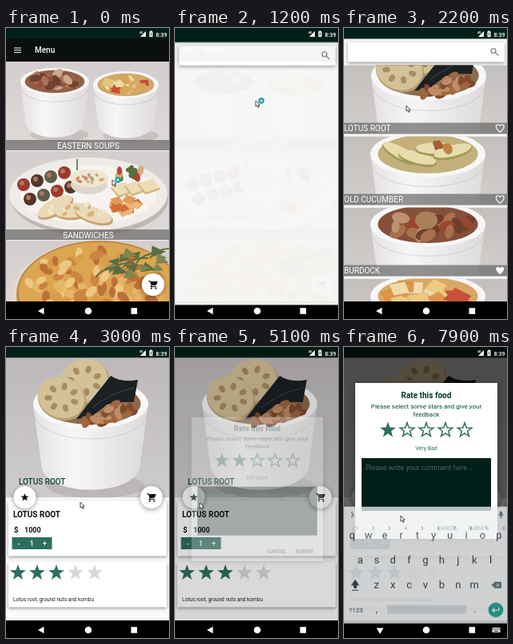
These frames come from a looping animation (204 px wide and 364 px high, 8000 ms). An HTML page with a canvas:

```html
<!DOCTYPE html>
<html lang="en">
<head>
<meta charset="utf-8">
<title>Food ordering app</title>
<style>
html, body { margin: 0; width: 100%; height: 100%; overflow: hidden; background: #000; }
canvas { display: block; width: 204px; height: 364px; }
</style>
</head>
<body>
<canvas id="stage"></canvas>
<script>
const W = 204, H = 364, LOOP = 8000, STEP = 100;
const GREEN = '#2e6e60', DARK = '#001f18', BAND = 'rgba(95,93,93,.65)', INK = '#263035';
const scale = window.devicePixelRatio || 1;

function sized(canvas) {
  canvas.width = W * scale;
  canvas.height = H * scale;
  return canvas;
}
const stage = sized(document.getElementById('stage'));
const buffer = sized(document.createElement('canvas'));
let g = stage.getContext('2d');

const HEART = new Path2D('M0 9C-14-2-9-9-5-9Q-2-9 0-6Q2-9 5-9C9-9 14-2 0 9z');
const CART = new Path2D('M-11-9h3l5 10h9l4-8h-16M-3 1l-2 4h13');
const STAR = new Path2D();
for (let i = 0; i < 10; i++) {
  const r = i % 2 ? 0.41 : 1, a = i * Math.PI / 5;
  STAR.lineTo(r * Math.sin(a), -r * Math.cos(a));
}
STAR.closePath();

// Drawing helpers
const clamp = v => Math.max(0, Math.min(1, v));
const progress = (t, start, length) => clamp((t - start) / length);
const easeOut = (p, power) => 1 - (1 - p) ** power;

function box(x, y, w, h, color) {
  g.fillStyle = color;
  g.fillRect(x, y, w, h);
}
function oval(x, y, rx, ry, color, angle = 0) {
  g.fillStyle = color;
  g.beginPath();
  g.ellipse(x, y, rx, ry, angle, 0, 7);
  g.fill();
}
function polygon(sides, x, y, rx, ry, color, angle = 0) {
  g.fillStyle = color;
  g.beginPath();
  for (let i = 0; i < sides; i++) {
    const a = angle + i * 2 * Math.PI / sides;
    g.lineTo(x + rx * Math.cos(a), y + ry * Math.sin(a));
  }
  g.fill();
}
function stroke(color, width, path) {
  g.strokeStyle = color;
  g.lineWidth = width;
  g.stroke(new Path2D(path));
}
function text(str, x, y, size, color, weight = 400, align = 'left') {
  g.font = `${weight} ${size}px Roboto, sans-serif`;
  g.textAlign = align;
  g.fillStyle = color;
  g.fillText(str, x, y);
}
const centered = (str, x, y, size, color, weight) => text(str, x, y, size, color, weight, 'center');
function shape(path, x, y, size, color, outline) {
  g.save();
  g.translate(x, y);
  g.scale(size, size);
  g.fillStyle = g.strokeStyle = color;
  g.lineWidth = outline / size;
  outline ? g.stroke(path) : g.fill(path);
  g.restore();
}
function shadowed(draw, blur = 4) {
  g.save();
  g.shadowColor = 'rgba(0,0,0,.4)';
  g.shadowBlur = blur * scale;
  g.shadowOffsetY = 1.5 * scale;
  draw();
  g.restore();
}
const card = (x, y, w, h) => shadowed(() => box(x, y, w, h, '#fff'));
const fab = (x, y) => shadowed(() => oval(x, y, 14, 14, '#fff'), 6);
function cartButton(x, y) {
  fab(x, y);
  box(x - 2.5, y - 4, 7, 4, '#111');
  shape(CART, x, y, 0.5, '#111', 1.2);
  for (const dx of [-2, 3.5]) oval(x + dx, y + 4.6, 1.1, 1.1, '#111');
}
function photo(y, h, dy, top, bottom, draw) {
  g.save();
  g.beginPath();
  g.rect(0, y, W, h);
  g.clip();
  const tone = g.createLinearGradient(0, y, 0, y + h);
  tone.addColorStop(0, top);
  tone.addColorStop(1, bottom);
  box(0, y, W, h, tone);
  g.translate(0, dy);
  draw();
  g.restore();
}
// Seeded pieces spread over an ellipse; sides = 0 makes them oval.
function scatter(seed, count, x, y, rx, ry, size, colors, sides = 0) {
  const random = () => (seed = seed * 16807 % 2147483647) / 2147483647;
  random();
  for (let i = 0; i < count; i++) {
    const a = random() * 6.28, r = Math.sqrt(random()), s = size * (0.8 + random() * 0.4);
    const px = x + rx * r * Math.cos(a), py = y + ry * r * Math.sin(a), turn = random() * 3;
    const color = colors[i % colors.length];
    if (sides) polygon(sides, px, py, s, s * 0.7, color, turn);
    else oval(px, py, s, s * 0.6, color, turn);
  }
}
// Draws a page off screen so that it can fade and move as one piece.
function layer(draw, alpha, dy = 0, zoom = 1) {
  if (alpha <= 0) return;
  const target = g;
  g = buffer.getContext('2d');
  g.setTransform(scale, 0, 0, scale, 0, 0);
  g.clearRect(0, 0, W, H);
  draw();
  g = target;
  g.save();
  g.globalAlpha = alpha;
  g.translate(W / 2, H / 2 + dy);
  g.scale(zoom, zoom);
  g.drawImage(buffer, -W / 2, -H / 2, W, H);
  g.restore();
}
function openPage(t, start, draw) {
  layer(draw, easeOut(progress(t, start, 200), 4), 29 * (1 - easeOut(progress(t, start, 350), 5)));
}

// Food
function pot(x, y, rx, ry, depth, broth) {
  const tone = g.createLinearGradient(x - rx, 0, x + rx, 0);
  tone.addColorStop(0, '#e4e1e2');
  tone.addColorStop(0.35, '#f7f6f7');
  tone.addColorStop(1, '#dddadc');
  oval(x + 6, y + depth * 0.95, rx * 0.85, ry * 0.5, 'rgba(130,122,125,.25)');
  g.fillStyle = tone;
  g.beginPath();
  g.moveTo(x - rx, y);
  g.lineTo(x - rx * 0.85, y + depth * 0.75);
  g.bezierCurveTo(x - rx * 0.7, y + depth * 1.08, x + rx * 0.7, y + depth * 1.08, x + rx * 0.85, y + depth * 0.75);
  g.lineTo(x + rx, y);
  g.fill();
  g.strokeStyle = 'rgba(150,145,148,.3)';
  g.lineWidth = 1;
  g.beginPath();
  g.ellipse(x, y + depth * 0.12, rx * 0.97, ry, 0, 0.1, Math.PI - 0.1);
  g.stroke();
  oval(x, y, rx, ry, '#f8f7f7');
  oval(x, y, rx * 0.87, ry * 0.84, broth);
}
function lotusSlice(x, y, r, angle) {
  oval(x, y, r, r * 0.85, '#b79e70', angle);
  oval(x - 1, y - 2, r * 0.96, r * 0.82, '#d3c198', angle);
  for (let i = 0; i < 7; i++) {
    const a = i * 0.9 + angle;
    oval(x + r * 0.55 * Math.cos(a), y - 2 + r * 0.45 * Math.sin(a), r * 0.15, r * 0.11, '#a88d61', a);
  }
}
function lotusPot() {
  pot(106, 71, 72, 31, 108, '#8d6c4a');
  lotusSlice(98, 44, 32, -0.4);
  lotusSlice(70, 65, 31, 0.4);
  g.fillStyle = '#1b2023';
  g.fill(new Path2D('M88 90Q110 62 131 36Q145 45 165 41L160 69Q125 66 108 88z'));
  stroke('#41484a', 1, 'M108 76Q130 58 160 51');
  scatter(19, 12, 112, 91, 18, 5, 6.5, ['#a0653f', '#804a2e', '#bf8c63']);
  scatter(7, 18, 143, 79, 20, 11, 6.5, ['#a0653f', '#804a2e', '#bf8c63']);
}
function cucumberPot() {
  pot(105, 80, 72, 29, 100, '#c3b07b');
  for (let i = 0; i < 4; i++) {
    const x = 70 + i * 22, y = 78 + 7 * Math.sin(i * 2), a = 0.5 - i * 0.25;
    oval(x, y + 2, 25, 8, '#a09a55', a);
    oval(x, y, 24, 7, '#e6dcad', a);
  }
  scatter(5, 4, 125, 72, 16, 4, 7, ['#a75d36', '#bf8446']);
}
function burdockPot() {
  pot(105, 79, 72, 28, 98, '#86503a');
  scatter(41, 22, 106, 79, 50, 15, 10, ['#a9704c', '#70402d', '#bc9272', '#9c4530']);
  oval(103, 74, 14, 11, '#aa8058');
}
function fruitPot() {
  pot(105, 80, 72, 28, 98, '#d9a866');
  scatter(23, 16, 105, 79, 48, 15, 15, ['#c8503a', '#ecca80', '#dd9549', '#efdcaa'], 4);
}
function soups() {
  pot(61, 67, 43, 17, 70, '#936048');
  scatter(12, 22, 61, 66, 28, 10, 7, ['#a97656', '#70412f', '#cba98e', '#94513c']);
  pot(150, 71, 41, 17, 67, '#d0a868');
  scatter(31, 14, 150, 70, 25, 9, 9, ['#e2c47e', '#eddba6', '#cc4a38', '#d8a656'], 4);
}
function sandwiches() {
  oval(105, 214, 98, 46, '#bdb8b5');
  oval(103, 208, 99, 46, '#eeebe8');
  oval(103, 208, 85, 37, '#f6f4f1');
  for (let i = 0; i < 8; i++) {
    const column = i % 4, x = 22 + column * 17 + (i > 3 ? 8 : 0), y = 196 - column * 5 + (i > 3 ? 18 : 0);
    oval(x, y, 8, 8, ['#9d3a2c', '#54352a', '#5c6044'][i % 3]);
    oval(x - 2, y - 2, 3, 3, '#b07460');
  }
  for (let i = 0; i < 3; i++) {
    oval(62 + i * 24, 225 + i * 5, 25, 10, '#c9a170', -0.5 + i * 0.4);
    oval(61 + i * 24, 223 + i * 5, 24, 9, '#ead9b6', -0.5 + i * 0.4);
    polygon(4, 145 + i * 17, 203 - i * 2, 15, 10, '#d7b77f', 0.3);
    polygon(4, 145 + i * 17, 201 - i * 2, 14, 9, '#eddcb4', 0.3);
  }
  scatter(14, 12, 88, 229, 38, 10, 4, ['#d5b17d', '#f1e5cb']);
  oval(104, 196, 23, 12, '#dcd5cb');
  oval(104, 188, 24, 11, '#f0e5cd');
  scatter(8, 12, 104, 188, 17, 6, 3, ['#d4ad80', '#a9a37d', '#c98b65']);
  box(88, 164, 2, 14, '#5d9258');
  scatter(61, 14, 154, 182, 19, 6, 6, ['#b04335', '#58703f', '#d4ac7c']);
  scatter(27, 18, 151, 222, 18, 9, 8, ['#e39a52', '#cf6f38', '#edb578'], 4);
}
function pizza() {
  oval(115, 336, 108, 70, '#e4d9c8');
  oval(117, 333, 104, 67, '#bd8a4c');
  oval(117, 331, 101, 63, '#dca552');
  scatter(99, 120, 114, 330, 88, 52, 8, ['#e5b568', '#cc8440', '#edc883', '#d99c4a', '#bd7138']);
  scatter(37, 14, 162, 292, 40, 17, 10, ['#5b6d40', '#7c8650'], 3);
  for (let i = 0; i < 5; i++) {
    const x = 112 + i * 17, y = 312 - i * 6;
    stroke('#5b6d40', 1.8, `M${x} ${y}q10-14 32-12`);
  }
}

// Screens
function bars() {
  box(0, 0, W, 13.5, DARK);
  box(0, 342, W, 22, '#000');
}
function menu() {
  [[soups, 'EASTERN SOUPS'], [sandwiches, 'SANDWICHES'], [pizza, '']].forEach(([food, name], i) => {
    const y = 42 + i * 112;
    photo(y, 112, 0, '#d3cecd', '#dfdbd9', food);
    box(0, y + 98, W, 13, BAND);
    centered(name, 103, y + 108.5, 10.1, '#fff');
    box(0, y + 111, W, 1, '#eee');
  });
  box(0, 13.5, W, 28, '#0b0f0e');
  for (let i = 0; i < 3; i++) box(10, 24.5 + i * 2.8, 9, 1, '#fff');
  text('Menu', 36, 31, 10, '#fff', 500);
  cartButton(184, 321);
  bars();
}
function list(loaded) {
  box(0, 0, W, H, '#f7f7f7');
  if (loaded) {
    [[lotusPot, 'LOTUS ROOT'], [cucumberPot, 'OLD CUCUMBER'], [burdockPot, 'BURDOCK'], [fruitPot, '']].forEach(([food, name], i) => {
      const y = 46.5 + i * 89;
      photo(y, 86, y - 58, '#c3bfbd', '#d2cecc', food);
      box(0, y + 72, W, 14, BAND);
      text(name, 0, y + 82.5, 10, '#fff');
      shape(HEART, 195.3, y + 79, 0.53, '#fff', i < 2 ? 1.2 : 0);
    });
  }
  box(0, 13.5, W, 32, '#f7f7f7');
  card(5, 17.5, 196, 25);
  stroke('#777', 1.2, 'M190 28.5a3 3 0 1 0-6 0a3 3 0 1 0 6 0M189.3 30.7l4 4');
  bars();
}
function starRow(x, y, rating, empty, outline) {
  for (let i = 0; i < 5; i++) {
    const filled = i < rating;
    shape(STAR, x + i * 24, y, filled || !outline ? 10.4 : 9.3, filled ? GREEN : empty, filled ? 0 : outline);
  }
}
function detail() {
  box(0, 0, W, H, '#fafafa');
  photo(13.5, 175, 0, '#bdb9bb', '#cfcccd', lotusPot);
  text('LOTUS ROOT', 16, 172, 10, '#0d4439', 500);
  card(3, 192, 198, 69.5);
  card(3, 269, 198, 56.5);
  fab(23.5, 188);
  shape(STAR, 23.5, 188.3, 5.3, '#111');
  cartButton(182, 188);
  text('LOTUS ROOT', 9, 213, 10, '#111', 700);
  text('$', 10, 231.5, 9.5, '#111', 700);
  text('1000', 23, 231.5, 9, '#111', 700);
  box(7.5, 238, 50, 15, GREEN);
  ['-', '1', '+'].forEach((label, i) => centered(label, 16 + i * 16.2, 249, 9.5, '#fff', 500));
  starRow(15, 282.5, 3, '#d8d8d8');
  text('Lotus root, ground nuts and kombu', 9, 318, 6.5, '#222');
  bars();
}
function dialog(rating) {
  shadowed(() => box(14, 80, 178, 195, '#fff'), 8);
  centered('Rate this food', 103, 99, 10, '#00382c', 700);
  centered('Please select some stars and give your', 103, 112, 8, '#00483a');
  centered('feedback', 103, 121.5, 8, '#00483a');
  starRow(55, 139, rating, GREEN, 1.5);
  centered(rating > 1 ? 'Not good' : 'Very Bad', 103, 163.5, 7, GREEN);
  box(22, 174, 162, 66, DARK);
  text('Please write your comment here ...', 27, 189, 8.9, '#4c645d');
  text('CANCEL', 117, 264, 6.8, '#004436', 500);
  text('SUBMIT', 155, 264, 6.8, '#004436', 500);
}
function keyboard() {
  box(0, 196, W, 146, '#eceff1');
  stroke('#78858a', 1.2, 'M9 203l3 3l-3 3');
  box(195, 202, 3, 5, '#566');
  stroke('#566', 1, 'M193.5 205q3 7 6 0M196.5 208v3');
  ['qwertyuiop', 'asdfghjkl', 'zxcvbnm'].forEach((keys, row) => {
    [...keys].forEach((key, i) => {
      const x = 102 + (i - (keys.length - 1) / 2) * 20.4;
      centered(key, x, 236 + row * 31, 13, INK);
      if (!row) centered((i + 1) % 10, x + 6, 225, 5, '#56646a');
    });
  });
  polygon(3, 14, 292, 6, 5, INK, -Math.PI / 2);
  box(12, 293, 4, 5, INK);
  box(10, 300, 8, 1, INK);
  box(188, 290, 9, 8, '#566');
  polygon(3, 188, 294, 4, 4.6, '#566', Math.PI);
  stroke('#eceff1', 1, 'M190.5 292l4 4m0-4l-4 4');
  centered('?123', 15, 328, 8, INK);
  centered(',', 41, 328, 12, INK);
  box(54, 319, 99, 11, '#cfd4d6');
  centered('.', 164, 328, 12, INK);
  oval(190, 325, 9.3, 9.3, '#18988b');
  stroke('#fff', 1.2, 'M194 322v3.5h-8l2.5-2.5m-2.5 2.5l2.5 2.5');
}
function systemIcons(typing) {
  text('4G', 167, 6.5, 3.5, '#fff', 700);
  g.fillStyle = '#fff';
  g.fill(new Path2D('M168 11h7v-7z'));
  box(179.5, 4.2, 4, 7, '#fff');
  box(180.7, 3.3, 1.6, 1.5, '#fff');
  box(181, 5.6, 1, 4, '#345');
  text('8:39', 187.5, 10.5, 7.1, '#fff', 500);
  polygon(3, 45, 354, 5, 5, '#fff', typing ? Math.PI / 2 : Math.PI);
  oval(103, 354, 4.3, 4.3, '#fff');
  box(156.5, 350.2, 7.6, 7.6, '#fff');
  if (!typing) return;
  box(185.5, 351, 10, 6, '#ddd');
  for (let i = 0; i < 4; i++) box(186.5 + i * 2.2, 352.3, 1.2, 1.2, '#000');
  box(188, 355, 5, 0.8, '#000');
}

// Each pointer move: when it begins, where it ends
const MOVES = [[100, 101, 91], [1300, 78, 97], [2400, 93, 194], [3900, 31, 195], [5200, 60, 139], [6500, 71, 211]];
function pointer(t) {
  let x = 133, y = 190;
  for (const [start, toX, toY] of MOVES) {
    const p = progress(t, start, 600), k = p * p * (3 - 2 * p);
    x += (toX - x) * k;
    y += (toY - y) * k;
  }
  const arrow = new Path2D('M0 0v7.2l1.7-1.5l1.3 2.7l1.2-.6l-1.2-2.6h2.2z');
  shape(arrow, x, y, 1, '#fff');
  shape(arrow, x, y, 1, '#222', 0.8);
  if (t < 1400) {
    oval(x + 7, y, 3.7, 3.7, '#20989c');
    oval(x + 7, y, 1.5, 1.5, '#d5f3f2');
  }
}

function render(t) {
  g.setTransform(scale, 0, 0, scale, 0, 0);
  g.clearRect(0, 0, W, H);
  if (t < 1500) menu();
  if (t < 2900) openPage(t, 1090, () => list(t >= 1500));
  openPage(t, 2550, detail);

  const shown = progress(t, 5050, 200);
  if (shown) {
    box(0, 0, W, H, `rgba(0,0,0,${0.6 * shown})`);
    const pan = -35 * easeOut(progress(t, 7750, 130), 2);
    layer(() => dialog(t < 6100 ? 2 : 1), shown, pan, 0.9 + 0.1 * shown);
  }
  const typing = t >= 7840;
  if (typing) {
    layer(keyboard, easeOut(progress(t, 7840, 150), 3), 14.6 * (1 - easeOut(progress(t, 7840, 250), 5)));
  }
  systemIcons(typing);
  pointer(t);
}

const begin = performance.now();
function tick() {
  const t = (performance.now() - begin) % LOOP;
  render(Math.floor(t / STEP) * STEP);
  requestAnimationFrame(tick);
}
tick();
</script>
</body>
</html>
```
